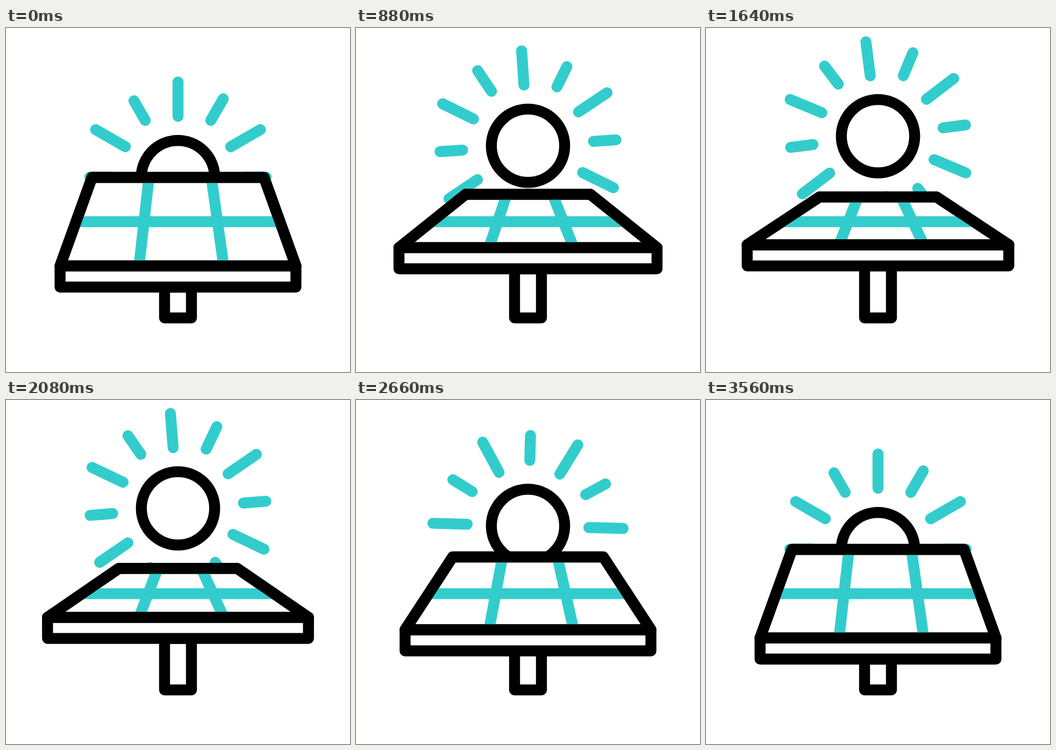
These frames come from a looping animation (640 px wide and 640 px high, 3600 ms). An HTML page:

```html
<!DOCTYPE html>
<html lang="en">
<head>
<meta charset="utf-8">
<title>Solar panel</title>
<style>
  html, body { margin: 0; width: 100%; height: 100%; overflow: hidden; background: #fff; }
  svg { display: block; width: 100%; height: 100%; }
  path, circle { stroke: #000; stroke-width: 20.4; stroke-linejoin: round; fill: #fff; }
  #rays, #grid { stroke: #3cc; fill: none; }
  #rays { stroke-linecap: round; }
</style>
</head>
<body>
<svg viewBox="0 0 640 640">
  <path id="rays"/>
  <circle id="sun" cx="320" r="68.2"/>
  <path id="post"/>
  <path id="base"/>
  <path id="top"/>
  <path id="grid"/>
  <path id="frame" style="fill:none"/>
</svg>
<script>
const LOOP = 3600;
const $ = id => document.getElementById(id);
const draw = (id, d) => $(id).setAttribute('d', d);
const mix = (a, b, p) => a + (b - a) * p;

// Each part rises, then falls: [start, end, x1, x2], with handles at y = 0 and y = 1
const moves = {
  panel: [[0, 1800, .33, 0], [1840, 3560, .54, .28]],
  sun: [[118, 2016, .33, .05], [1900, 3560, .47, .5]],
  turn: [[127, 1894, .435, .383], [1920, 3560, .53, .45]]
};

function ease(t, [start, end, x1, x2]) {
  const x = (t - start) / (end - start);
  if (x <= 0) return 0;
  if (x >= 1) return 1;
  let lo = 0, hi = 1;
  for (let i = 0; i < 24; i++) {
    const s = (lo + hi) / 2, r = 1 - s;
    if (3 * x1 * s * r * r + 3 * x2 * s * s * r + s * s * s < x) lo = s;
    else hi = s;
  }
  return lo * lo * (3 - 2 * lo);
}

const level = (name, t) => ease(t, moves[name][0]) - ease(t, moves[name][1]);

function rayPath(cy, turn) {
  let d = '';
  for (let i = 0; i < 12; i++) {
    const long = i % 2 === 0;
    const inner = long ? 113.2 : 122;
    const outer = long ? 177 : i === 1 || i === 5 ? 168.2 : 164;
    const a = (i * 30 + turn) * Math.PI / 180;
    const at = r => `${320 + r * Math.sin(a)} ${cy - r * Math.cos(a)}`;
    d += `M${at(inner)}L${at(outer)}`;
  }
  return d;
}

function render(t) {
  const cy = 277.5 - 77.5 * level('sun', t);
  $('sun').setAttribute('cy', cy);
  draw('rays', rayPath(cy, 360 * level('turn', t)));

  const p = level('panel', t);
  const y1 = mix(278, 314.3, p), y2 = mix(442.7, 403.2, p), y3 = y2 + 39.3;
  const x1 = mix(160, 211.5, p), x2 = mix(100.6, 76.6, p);
  const side = mix(x1, x2, (360.4 - y1) / (y2 - y1));
  const slab = `M${x1} ${y1}H${640 - x1}L${640 - x2} ${y2}H${x2}Z`;

  draw('post', `M295 ${y3}H345V539.4H295Z`);
  draw('base', `M${x2} ${y2}H${640 - x2}V${y3}H${x2}Z`);
  draw('top', slab);
  draw('frame', slab);
  draw('grid', `M${side} 360.4H${640 - side}` +
    `M${mix(266, 282.9, p)} ${y1}L247.5 ${y2}` +
    `M${mix(382, 362.8, p)} ${y1}L405 ${y2}`);
}

const begin = performance.now();
function tick() {
  render((performance.now() - begin) % LOOP);
  requestAnimationFrame(tick);
}
tick();
</script>
</body>
</html>
```
